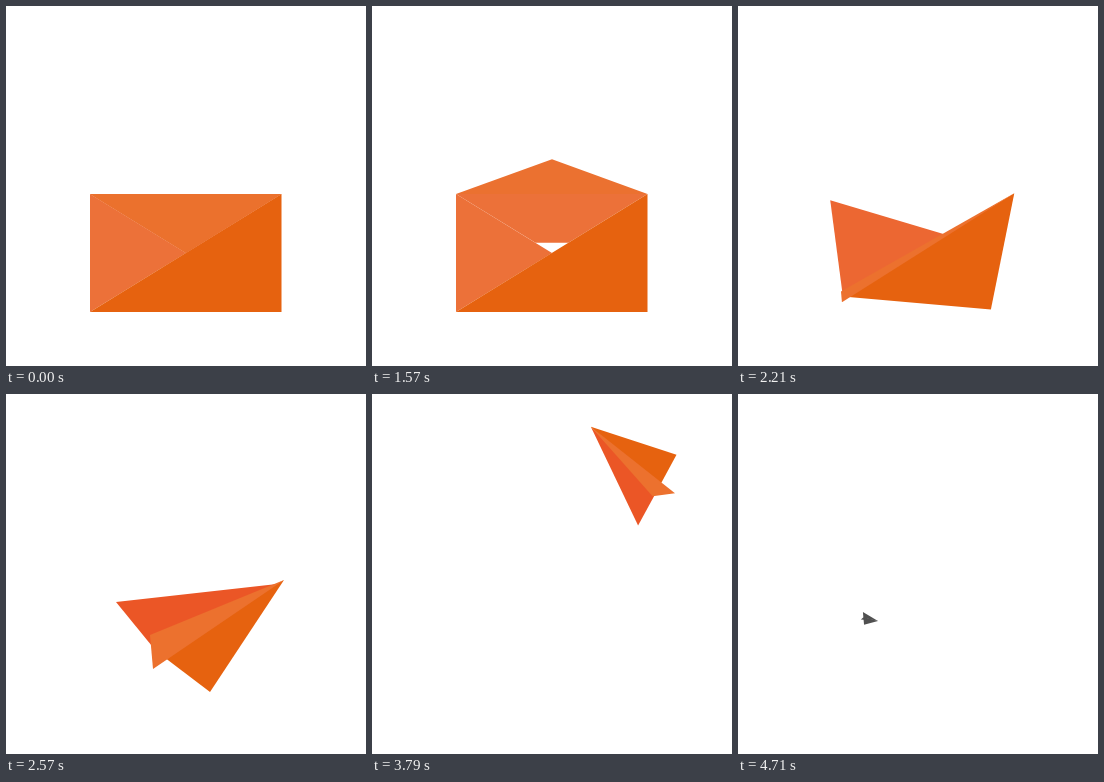
Recreate the animation shown at these times as an HTML page with a canvas. Size 360 by 360 pixels, loop 4.78 s.

```html
<!DOCTYPE html>
<html lang="en">
<head>
<meta charset="utf-8">
<title>Envelope to paper plane</title>
<style>
html, body { margin: 0; width: 100%; height: 100%; overflow: hidden; background: #fff; }
canvas { display: block; }
</style>
</head>
<body>
<canvas id="stage" width="360" height="360"></canvas>
<script>
const ctx = document.getElementById('stage').getContext('2d');
const LOOP = 4780, FPS = 14;

const smooth = u => u * u * (3 - 2 * u);
const mix = (a, b, u) => a.map((v, i) => v + (b[i] - v) * u);
const mixPoints = (a, b, u) => a.map((p, i) => mix(p, b[i], u));
const span = (n, from, to) => Math.max(0, Math.min(1, (n - from) / (to - from)));

function poly(color, ...points) {
  ctx.fillStyle = `rgb(${color.map(Math.round)})`;
  ctx.beginPath();
  points.forEach(p => ctx.lineTo(...p));
  ctx.fill();
}

const LIGHT = [236, 113, 57], DARK = [230, 98, 15], RED = [235, 86, 38];
const FIN = [236, 113, 46], FLAP = [235, 113, 45], GREY = [80, 80, 80];

// Envelope: corners A B C D clockwise from top left, folds meet at M
const A = [84, 188], B = [275.5, 188], C = [275.5, 306], D = [84, 306], M = [180, 247];

function drawEnvelope(n) {
  const open = smooth(span(n, 1, 13.5));
  const fold = span(n, 20, 28);
  const lift = fold ? 58 * (1 - fold) ** 1.77 : 117 * open - 59;
  const cut = 1 - fold ** 1.27;

  poly(LIGHT, A, B, mix(B, M, cut), mix(A, M, cut));
  poly(LIGHT, A, M, D);
  poly(DARK, B, C, D);
  poly(mix(FLAP, LIGHT, fold), A, [M[0], A[1] - lift], B);
}

// Plane points: nose, tip, left wing, crease, fin, root, right wing
const FOLDED = [M, B, A, D, D, D, C];
const PLANE = [[271, 190], [278, 186], [110, 208], [144, 241], [147, 275], [150, 257], [204, 298]];
const GLIDER = [[312, 153], [312, 153], [157, 193], [195, 222], [193, 255], [198, 227], [248, 268]];

// Evenly timed waypoints of the tip
const ROUTE = [[312, 153], [308, 79], [223.5, 33], [108, 64], [36, 146], [140, 227]];

function along(route, u) {
  const last = route.length - 1;
  const i = Math.min(last - 1, Math.floor(u * last)), t = u * last - i;
  const [p, a, b, q] = [i - 1, i, i + 1, i + 2].map(j => route[Math.max(0, Math.min(last, j))]);
  return a.map((v, c) => v + t / 2 * (b[c] - p[c]
    + t * (2 * p[c] - 5 * v + 4 * b[c] - q[c]
    + t * (3 * (v - b[c]) + q[c] - p[c]))));
}

// The glider turns left and shrinks while its tip follows the route
function fly(u) {
  const [x, y] = along(ROUTE, u);
  const turn = -314.5 * u ** 1.27 * Math.PI / 180;
  const scale = 1 - .89 * u ** 1.16;
  const c = Math.cos(turn) * scale, s = Math.sin(turn) * scale;
  return GLIDER.map(([px, py]) => {
    const dx = px - ROUTE[0][0], dy = py - ROUTE[0][1];
    return [x + dx * c - dy * s, y + dx * s + dy * c];
  });
}

function drawPlane(n) {
  const [nose, tip, left, crease, fin, root, right] =
    n <= 36 ? mixPoints(FOLDED, PLANE, smooth(span(n, 28, 36)))
    : n <= 44 ? mixPoints(PLANE, GLIDER, span(n, 36, 44) ** 1.3)
    : fly(span(n, 44, 66));
  const fade = span(n, 60, 66);
  const wing = mix(LIGHT, RED, span(n, 28, 36));
  poly(mix(wing, GREY, fade), nose, left, root);
  poly(mix(DARK, GREY, fade), tip, root, right);
  poly(mix(FIN, GREY, fade), tip, crease, fin);
}

function draw(time) {
  const n = Math.floor((time % LOOP + 5) * FPS / 1000) % 67;
  ctx.clearRect(0, 0, 360, 360);
  (n < 28 ? drawEnvelope : drawPlane)(n);
}

const start = performance.now();
function tick() {
  draw(performance.now() - start);
  requestAnimationFrame(tick);
}
tick();
</script>
</body>
</html>
```
